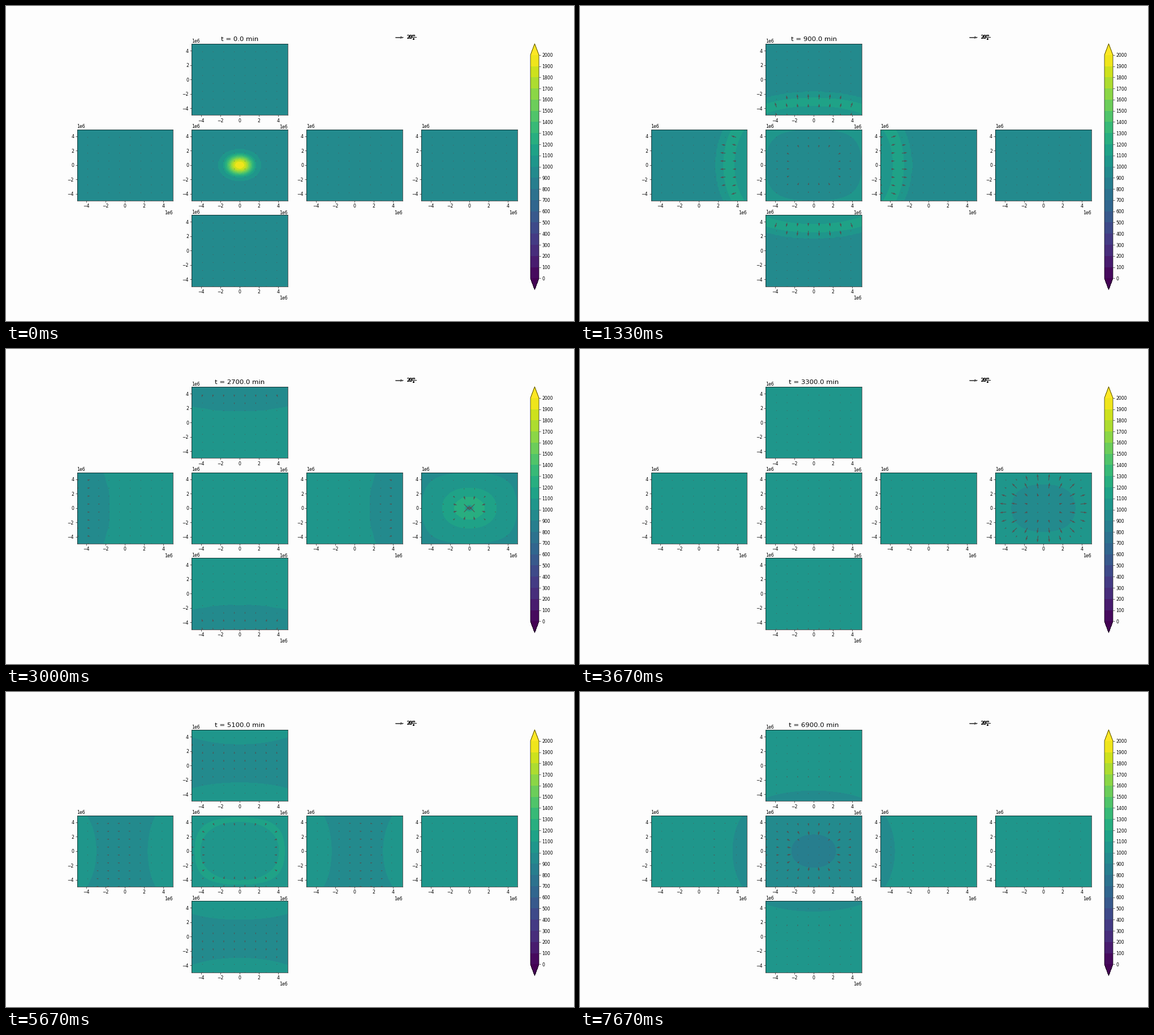
Write a matplotlib script that moves like this. It is 1004x558 px and loops after 8 s.

```python
import numpy as np
import matplotlib.pyplot as plt
from matplotlib.animation import FuncAnimation

# Shallow water on a cubed sphere: a bell of water collapses, the wave meets
# at the antipode and returns. By symmetry only a strip running from the front
# panel's centre over one side panel to the back panel's centre is solved.
G, R, H0 = 9.81, 6.371e6, 1000.0
N = 80                      # cells along one panel
n = N // 2
FRAMES, LOOP = 24, 8000
MINUTES, STEPS = 300, 75    # model time and steps per frame
DT = MINUTES * 60 / STEPS


def unit(v):
    return v / np.sqrt((v * v).sum(0))


def cross(a, b):
    return np.cross(a, b, axis=0)


# Grid nodes, cell centres and local directions
lam = np.arange(4 * n + 1)[:, None] * np.pi / (4 * n)
turn = np.round(lam / (np.pi / 2)) * np.pi / 2
slope = np.tan(lam - turn)
beta = np.arange(n + 1)[None] * np.pi / (4 * n)
P = unit(np.stack(np.broadcast_arrays(
    np.cos(turn) - slope * np.sin(turn),
    np.sin(turn) + slope * np.cos(turn),
    np.tan(beta))))
sw, se, nw, ne = P[:, :-1, :-1], P[:, 1:, :-1], P[:, :-1, 1:], P[:, 1:, 1:]
centre = unit(sw + se + nw + ne)
east = unit(se + ne - sw - nw)
north = unit(nw + ne - sw - se)
area = 0.5 * R**2 * np.sqrt((cross(ne - sw, nw - se) ** 2).sum(0))


def edge(a, b):
    c = cross(a, b)
    size = np.sqrt((c * c).sum(0))
    return c / size, R * np.arcsin(size)


norm_i, len_i = edge(P[:, :, 1:], P[:, :, :-1])
norm_j, len_j = edge(P[:, :-1], P[:, 1:])
closure = np.diff(norm_i * len_i, axis=1) + np.diff(norm_j * len_j, axis=2)
norm_j = np.ascontiguousarray(norm_j.swapaxes(1, 2))
len_j = np.ascontiguousarray(len_j.T)

FLIP_Y = np.array([1, 1, -1, 1])[:, None, None]
FLIP_Z = np.array([1, 1, 1, -1])[:, None, None]
SWAP = [0, 1, 3, 2]


def pad(w):
    """Add two rows of mirrored or neighbouring cells on every side."""
    p = np.zeros((4, 4 * n + 4, n + 4))
    p[:, 2:-2, 2:-2] = w
    p[:, :, :2] = FLIP_Z * p[:, :, 3:1:-1]
    p[:, 2:n + 2, -2:] = w[SWAP, n:n + 2].swapaxes(1, 2)
    p[:, n + 2:3 * n + 2, -2:] = w[SWAP, n:3 * n, :-3:-1]
    p[:, 3 * n + 2:-2, -2:] = w[SWAP, 3 * n - 1:3 * n - 3:-1, ::-1].swapaxes(1, 2)
    p[:, :2] = FLIP_Y * p[:, 3:1:-1]
    p[:, -2:] = FLIP_Y * p[:, -3:-5:-1]
    return p


def flux(w, normal, length):
    d = np.diff(w, axis=1)
    a, b = d[:, :-1], d[:, 1:]
    s = np.maximum(a * b, 0) / (a + b + 1e-30)
    left = w[:, 1:-2] + s[:, :-1]
    right = w[:, 2:-1] - s[:, 1:]
    hl, hr = left[0], right[0]
    ul = (normal * left[1:]).sum(0)
    ur = (normal * right[1:]).sum(0)
    speed = np.maximum(np.abs(ul) + np.sqrt(G * hl), np.abs(ur) + np.sqrt(G * hr))
    left[1:] *= hl
    right[1:] *= hr
    f = 0.5 * (left * (ul + speed) + right * (ur - speed))
    f[1:] += normal * (0.25 * G * (hl * hl + hr * hr - 2 * H0**2))
    return f * length


def rate(q):
    w = q.copy()
    w[1:] /= q[0]
    p = pad(w)
    fi = flux(p[:, :, 2:-2], norm_i, len_i)
    fj = flux(np.ascontiguousarray(p[:, 2:-2].swapaxes(1, 2)), norm_j, len_j)
    dq = -np.diff(fi, axis=1) - np.diff(fj, axis=1).swapaxes(1, 2)
    dq[1:] += closure * (0.5 * G * (q[0] ** 2 - H0**2))
    dq /= area
    dq[1:] -= centre * (centre * dq[1:]).sum(0)
    return dq


def solve():
    dist = R * np.arccos(np.clip(centre[0], -1, 1))
    bell = R / 3
    q = np.zeros((4, 4 * n, n))
    q[0] = H0 + np.where(dist < bell, 500 * (1 + np.cos(np.pi * dist / bell)), 0)
    states = [q]
    for _ in range(FRAMES - 1):
        for _ in range(STEPS):
            mid = q + DT * rate(q)
            q = 0.5 * (q + mid + DT * rate(mid))
        states.append(q)
    return states


def panels(q):
    """Depth and both velocity parts for top, left, front, right, back, bottom."""
    vel = q[1:] / q[0]
    half = np.stack([q[0], (vel * east).sum(0), (vel * north).sum(0)]).swapaxes(1, 2)
    odd_x = np.array([1, -1, 1])[:, None, None]
    odd_y = np.array([1, 1, -1])[:, None, None]
    strip = np.concatenate([odd_y * half[:, ::-1], half], axis=1)
    a, right, b = strip[:, :, :n], strip[:, :, n:3 * n], strip[:, :, 3 * n:]
    front = np.concatenate([odd_x * a[:, :, ::-1], a], axis=2)
    back = np.concatenate([b, odd_x * b[:, :, ::-1]], axis=2)
    left = odd_x * right[:, :, ::-1]
    top = right.swapaxes(1, 2)[[0, 2, 1]]
    bottom = odd_y * top[:, ::-1]
    return top, left, front, right, back, bottom


states = solve()

DPI = 55.8
LIM = 4.954e6
LEVELS = np.arange(0, 2001, 100)
TICKS = np.arange(-4e6, 4.1e6, 2e6)
pos = np.linspace(-LIM, LIM, N)
spots = -4.95e6 + 1.1e6 * np.arange(9)
pick = ((spots / LIM + 1) * n).astype(int)
grid = np.ix_(pick, pick)

fig = plt.figure(figsize=(1004.01 / DPI, 558.01 / DPI), dpi=DPI, facecolor="#fdfdfd")
axes = [fig.add_subplot(3, 4, k) for k in (2, 5, 6, 7, 8, 10)]
quivers = []
zero = np.zeros((9, 9))
for ax in axes:
    ax.set(xlim=(-LIM, LIM), ylim=(-LIM, LIM), xticks=TICKS, yticks=TICKS)
    arrows = ax.quiver(spots, spots, zero, zero, color="0.32", scale=240, zorder=2.2)
    ax.quiverkey(arrows, 0.7, 0.9, 20, r"$20 \frac{m}{s}$", labelpos="E",
                 coordinates="figure")
    quivers.append(arrows)
title = axes[0].set_title("", fontsize=15)
fills = []


def draw(i):
    for old in fills:
        old.remove()
    fills.clear()
    for ax, arrows, (h, u, v) in zip(axes, quivers, panels(states[i])):
        fills.append(ax.contourf(pos, pos, h, LEVELS, cmap="viridis", extend="both"))
        arrows.set_UVC(u[grid], v[grid])
    title.set_text(f"t = {i * MINUTES:.1f} min")


draw(0)
cax = fig.add_axes([927 / 1004, 0.1, 15 / 1004, 0.78])
fig.colorbar(fills[0], cax=cax, ticks=LEVELS)

anim = FuncAnimation(fig, draw, frames=FRAMES, init_func=lambda: None,
                     interval=LOOP / FRAMES, repeat=True, repeat_delay=0)
plt.show()
```
